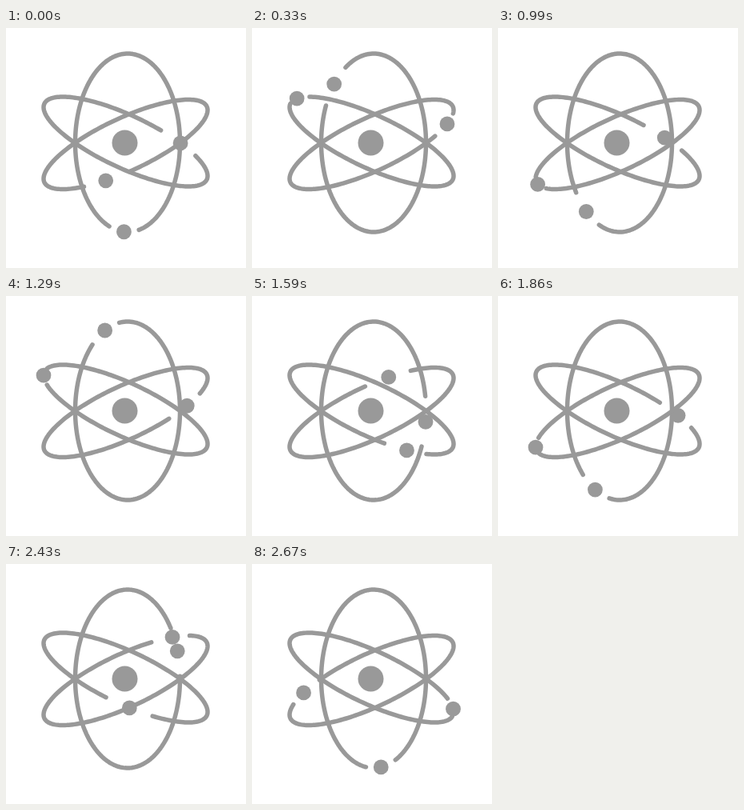
Write an HTML page with a canvas that moves like this. It is 300 px wide and 300 px high and loops after 2700 ms.

```html
<!DOCTYPE html>
<html lang="en">
<head>
<meta charset="utf-8">
<title>Atom</title>
<style>
  html, body { margin: 0; width: 100%; height: 100%; overflow: hidden; background: #fff; }
  canvas { display: block; width: 300px; height: 300px; }
</style>
</head>
<body>
<canvas id="stage" width="300" height="300"></canvas>
<script>
const ctx = document.getElementById('stage').getContext('2d');
const LOOP = 2700, STEP = 30, TURN = 900, GAP = 16.5;
const rad = deg => deg * Math.PI / 180;

// x = cx + w cos, y = cy + skew cos + h sin. The electron's angle is
// start + speed * t, plus a small sway that peaks at `peak`.
// Until `lead` it runs evenly from the angle `from`.
const orbits = [
  { cx: 152, cy: 143.5, w: 65.5, h: 111.5, skew: 0,
    start: 91, speed: 0.4, sway: 3, peak: 10, lead: 0, from: 0 },
  { cx: 149.5, cy: 142, w: 102.5, h: 36, skew: 42.9,
    start: -20.8, speed: -0.4, sway: 3.2, peak: 850, lead: 300, from: -48 },
  { cx: 149.5, cy: 145.5, w: 102.5, h: 36, skew: -42.9,
    start: 199.5, speed: -0.4, sway: 3.5, peak: 980, lead: 600, from: 104 }
];

function steadyAngle(o, t) {
  return o.start + o.speed * t + o.sway * Math.cos(2 * Math.PI * (t - o.peak) / TURN);
}

function angleAt(o, t) {
  if (t >= o.lead) return steadyAngle(o, t);
  return o.from + (steadyAngle(o, o.lead) - o.from) * t / o.lead;
}

function pointAt(o, deg) {
  const c = Math.cos(rad(deg)), s = Math.sin(rad(deg));
  return [o.cx + o.w * c, o.cy + o.skew * c + o.h * s];
}

function dot(x, y, r) {
  ctx.beginPath();
  ctx.arc(x, y, r, 0, 2 * Math.PI);
  ctx.fill();
}

function drawOrbit(o, t) {
  const angle = angleAt(o, t), arc = 360 - 2 * GAP, parts = 180;
  ctx.beginPath();
  for (let i = 0; i <= parts; i++) {
    ctx.lineTo(...pointAt(o, angle + GAP + arc * i / parts));
  }
  ctx.stroke();
  dot(...pointAt(o, angle), 9.4);
}

function draw(t) {
  ctx.clearRect(0, 0, 300, 300);
  ctx.fillStyle = ctx.strokeStyle = '#999';
  ctx.lineWidth = 5.5;
  ctx.lineCap = ctx.lineJoin = 'round';
  orbits.forEach(o => drawOrbit(o, t));
  dot(148.5, 143.5, 16);
}

const begin = performance.now();
function tick() {
  const t = (performance.now() - begin) % LOOP;
  draw(Math.floor(t / STEP) * STEP);
  requestAnimationFrame(tick);
}
tick();
</script>
</body>
</html>
```
